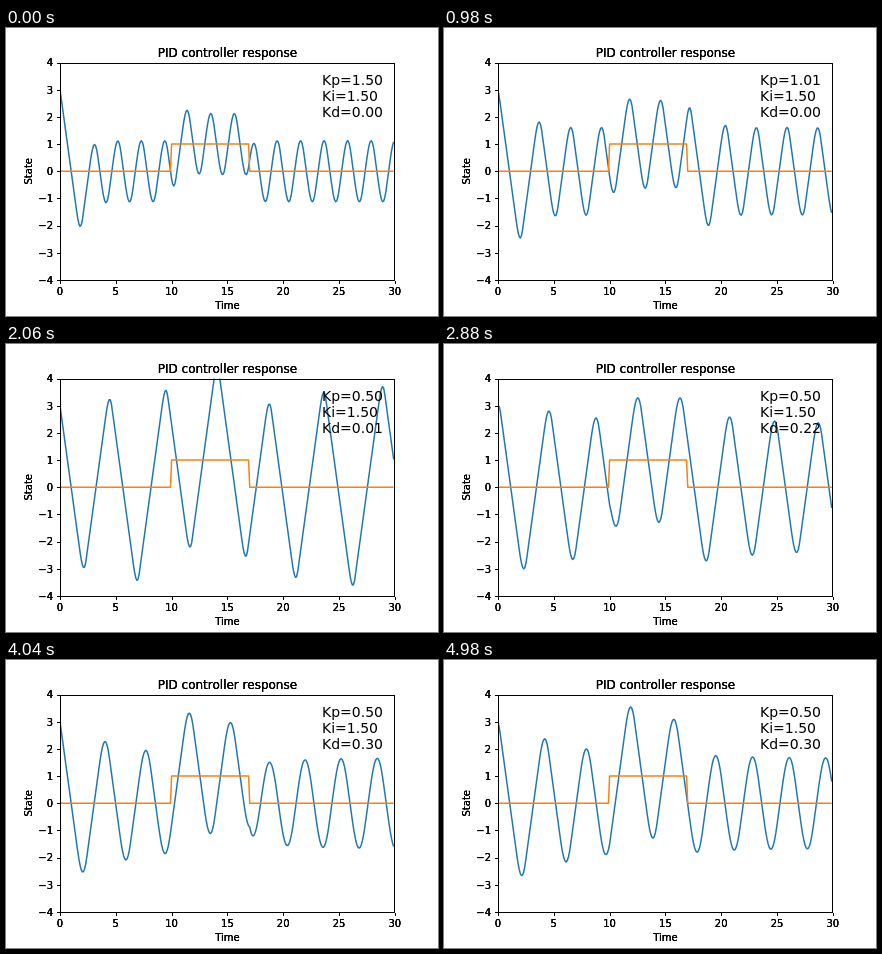
Animation, 432 px wide and 288 px high, one loop 5000 ms. Source, as an HTML page with a canvas:

```html
<!DOCTYPE html>
<html lang="en">
<head>
<meta charset="utf-8">
<title>PID controller response</title>
<style>
  html, body { margin: 0; width: 100%; height: 100%; overflow: hidden; background: #fff; }
  canvas { display: block; width: 432px; height: 288px; }
</style>
</head>
<body>
<canvas id="stage" width="432" height="288"></canvas>
<script>
const ctx = document.getElementById('stage').getContext('2d');
const FONT = '"DejaVu Sans", Verdana, sans-serif';
const FRAME_MS = 20, FRAMES = 250;
const DT = 0.1, STEPS = 300;
const KEEP = 0.957, GAIN = 0.59, VMAX = 3;   // plant: drag, input gain, speed limit
const BOX = { l: 54, r: 388.8, t: 34.56, b: 252 };

const px = t => BOX.l + t / 30 * (BOX.r - BOX.l);
const py = y => BOX.b - (y + 4) / 8 * (BOX.b - BOX.t);
const target = n => (n >= 100 && n < 170 ? 1 : 0);

function gains(frame) {
  return {
    kp: 1.5 - 0.01 * Math.min(frame, 100),
    ki: 1.5,
    kd: 0.005 * Math.min(Math.max(frame - 100, 0), 60)
  };
}

// One run of the loop; the speed v carries over into the next run.
function simulate({ kp, ki, kd }, v) {
  const xs = [];
  let x = 3, sum = 0, last = null;
  for (let n = 0; n < STEPS; n++) {
    xs.push(x);
    const err = target(n) - x;
    const slope = last === null ? 0 : (err - last) / DT;
    sum += err * DT;
    last = err;
    const u = kp * err + ki * sum + kd * slope;
    v = Math.max(-VMAX, Math.min(VMAX, KEEP * v + GAIN * u));
    x += v * DT;
  }
  return { xs, v };
}

const runs = [];
for (let f = 0, v = 0; f < FRAMES; f++) {
  const run = simulate(gains(f), v);
  runs.push(run.xs);
  v = run.v;
}

function plot(value, color) {
  ctx.beginPath();
  for (let n = 0; n < STEPS; n++) ctx.lineTo(px(n * DT), py(value(n)));
  ctx.strokeStyle = color;
  ctx.lineWidth = 1.5;
  ctx.lineJoin = 'round';
  ctx.stroke();
}

function text(str, x, y, size, align, passes = 1) {
  ctx.font = size + 'px ' + FONT;
  ctx.textAlign = align;
  ctx.fillStyle = '#000';
  for (let i = 0; i < passes; i++) ctx.fillText(str, x, y);
}

function tick(x, y, dx, dy) {
  ctx.fillRect(x, y, dx, dy);
}

function drawAxes() {
  const { l, r, t, b } = BOX;
  ctx.strokeStyle = '#000';
  ctx.lineWidth = 1;
  ctx.strokeRect(54.5, 35.5, 334, 217);
  for (let v = 0; v <= 30; v += 5) {
    const x = px(v);
    ctx.fillStyle = '#000';
    tick(Math.round(x), 253, 1, 3);
    text(String(v), x, 267, 10, 'center', 3);
  }
  for (let v = -4; v <= 4; v++) {
    const y = py(v);
    ctx.fillStyle = '#000';
    tick(51, Math.round(y), 3, 1);
    text(String(v).replace('-', '\u2212'), 47, y + 3.8, 10, 'right', 3);
  }
  text('PID controller response', (l + r) / 2, 28.6, 12, 'center', 3);
  text('Time', (l + r) / 2, 281, 10, 'center', 3);
  ctx.save();
  ctx.translate(26, (t + b) / 2);
  ctx.rotate(-Math.PI / 2);
  text('State', 0, 0, 10, 'center', 3);
  ctx.restore();
}

function draw(frame) {
  ctx.fillStyle = '#fff';
  ctx.fillRect(0, 0, 432, 288);

  ctx.save();
  ctx.beginPath();
  ctx.rect(BOX.l, BOX.t, BOX.r - BOX.l, BOX.b - BOX.t);
  ctx.clip();
  plot(n => runs[frame][n], '#1f77b4');
  plot(target, '#ff7f0e');
  ctx.restore();

  drawAxes();
  const { kp, ki, kd } = gains(frame);
  [['Kp', kp], ['Ki', ki], ['Kd', kd]].forEach(([name, k], i) =>
    text(name + '=' + k.toFixed(2), 316, 56.5 + 16.3 * i, 14, 'left'));
}

const start = performance.now();
function loop(now) {
  const ms = Math.max(0, now - start) % (FRAME_MS * FRAMES);
  draw(Math.floor(ms / FRAME_MS) % FRAMES);
  requestAnimationFrame(loop);
}
draw(0);
requestAnimationFrame(loop);
</script>
</body>
</html>
```
